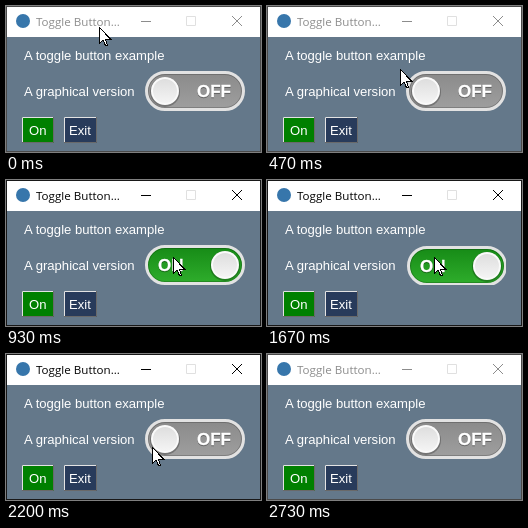
An HTML page that plays this animation: 255 px wide and 146 px high, repeating every 2870 ms.

```html
<!DOCTYPE html>
<html lang="en">
<head>
<meta charset="utf-8">
<title>Toggle button</title>
<style>
html, body { margin: 0; width: 100%; height: 100%; overflow: hidden; }
svg { display: block; width: 100vw; height: 100vh; }
text { font: 13.1px "Liberation Sans", Arial, sans-serif; fill: #fff; }
.title { font: 11.6px "Open Sans", "Noto Sans", sans-serif; fill: currentColor; }
.label { font-size: 17px; font-weight: bold; stroke: #fff; stroke-width: .3; }
.label.shade { fill: #000; stroke: #000; opacity: .35; }

.bar, .edge, .face, .on, .off, .cursor {
  animation: 2870ms step-end infinite;
}
.bar { animation-name: focus; }
.edge { animation-name: edge; }
.face { animation-name: press; }
.on { animation-name: on; }
.off { animation-name: off; }
.cursor { animation-name: move; shape-rendering: crispEdges; }

@keyframes focus {
  0%, 95.12% { color: #8c8c8c; }
  27.87% { color: #000; }
}
@keyframes edge {
  0%, 95.12% { stroke: #4a4a4a; }
  27.87% { stroke: #181818; }
}
@keyframes press {
  0%, 32.4%, 60.27% { transform: none; }
  27.87%, 58.18% { transform: translate(1px, 1px); }
}
@keyframes on {
  0%, 60.27% { visibility: hidden; }
  32.4% { visibility: visible; }
}
@keyframes off {
  0%, 60.27% { visibility: visible; }
  32.4% { visibility: hidden; }
}
@keyframes move {
  0% { transform: translate(93px, 21px); }
  4.52% { transform: translate(94px, 23px); }
  6.96% { transform: translate(97px, 28px); }
  9.4% { transform: translate(104px, 37px); }
  13.93% { transform: translate(121px, 54px); }
  16.37% { transform: translate(133px, 63px); }
  18.46% { transform: translate(149px, 70px); }
  20.9% { transform: translate(160px, 74px); }
  23.34% { transform: translate(165px, 76px); }
  25.43% { transform: translate(167px, 77px); }
  76.65% { transform: translate(146px, 93px); }
  79.09% { transform: translate(110px, 118px); }
  81.18% { transform: translate(76px, 139px); }
  83.62%, 100% { transform: translate(76px, 160px); }
}
</style>
</head>
<body>
<svg viewBox="0 0 255 146" preserveAspectRatio="none">
  <defs>
    <linearGradient id="grey" x2="0" y2="1">
      <stop stop-color="#8a8a8a"/>
      <stop offset="1" stop-color="#9f9f9f"/>
    </linearGradient>
    <linearGradient id="green" x2="0" y2="1">
      <stop stop-color="#168a16"/>
      <stop offset="1" stop-color="#2fae2c"/>
    </linearGradient>
    <linearGradient id="shine" x2="0" y2="1">
      <stop stop-color="#dedede"/>
      <stop offset="1" stop-color="#f4f4f4"/>
    </linearGradient>
    <clipPath id="area"><path d="M139 65h100v40h-100z"/></clipPath>
    <g id="knob">
      <circle cy="1" r="15" fill="#000" opacity=".25"/>
      <circle r="14" fill="#fafafa"/>
      <circle r="12" fill="url(#shine)"/>
    </g>
    <rect id="pill" x="140.5" y="66.5" width="97" height="37" rx="18.5" stroke="#e2e2e2" stroke-width="3"/>
    <rect id="rim" x="142.5" y="68.5" width="93" height="33" rx="16.5" fill="none" stroke="#000" opacity=".2"/>
  </defs>

  <rect width="255" height="146" fill="#64788a"/>

  <g class="bar">
    <rect width="255" height="31" fill="#fff"/>
    <circle cx="17" cy="15" r="7" fill="#3776ab"/>
    <text class="title" x="30" y="20">Toggle Button...</text>
    <g fill="none" stroke="currentColor">
      <path d="M135 15.5h10"/>
      <path d="M180.5 10.5h9v9h-9z" stroke="#e0e0e0"/>
      <path d="M226 10l10 10M236 10l-10 10"/>
    </g>
  </g>

  <text x="18" y="54">A toggle button example</text>
  <text x="18" y="90">A graphical version</text>

  <g clip-path="url(#area)">
    <g class="face">
      <g class="off">
        <use href="#pill" fill="url(#grey)"/>
        <use href="#rim"/>
        <use href="#knob" x="159" y="85"/>
        <text class="label shade" x="191" y="92">OFF</text>
        <text class="label" x="191" y="91">OFF</text>
      </g>
      <g class="on">
        <use href="#pill" fill="url(#green)"/>
        <use href="#rim"/>
        <use href="#knob" x="219" y="85"/>
        <text class="label shade" x="152" y="92">ON</text>
        <text class="label" x="152" y="91">ON</text>
      </g>
    </g>
  </g>

  <g fill="none">
    <path d="M16 111h32v26h-32z" fill="#008000"/>
    <path d="M58 111h33v26h-33z" fill="#283b5b"/>
    <path d="M16.5 137v-25.5h31.5M58.5 137v-25.5h32.5" stroke="#e3e3e3"/>
    <path d="M16 136.5h31.5v-25.5M58 136.5h32.5v-25.5" stroke="#696969"/>
  </g>
  <text x="23" y="129">On</text>
  <text x="63" y="129">Exit</text>

  <rect class="edge" x=".5" y=".5" width="254" height="145" fill="none"/>

  <path class="cursor" d="M.5 .5v16l3.5-3.5 2.5 5.5h2l-2-6.5h5z" fill="#fff" stroke="#000"/>
</svg>
</body>
</html>
```
